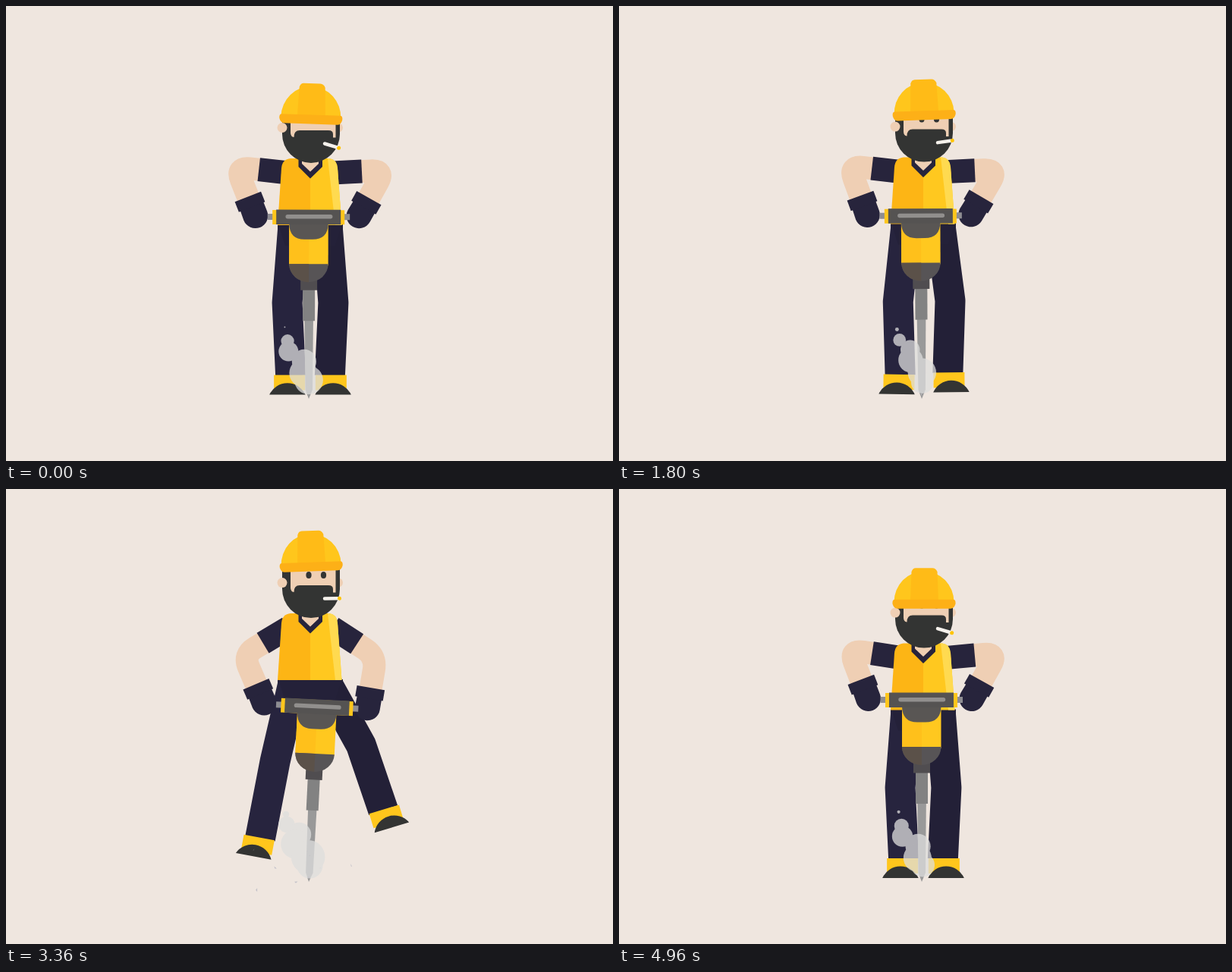
Animation of 800x600 px, one loop 5000 ms. Source, as an HTML page:

```html
<!DOCTYPE html>
<html lang="en">
<head>
<meta charset="utf-8">
<title>Worker with jackhammer</title>
<style>
html, body { margin: 0; width: 100%; height: 100%; overflow: hidden; background: #efe6df; }
svg { display: block; width: 100%; height: 100%; }
</style>
</head>
<body>
<svg viewBox="0 0 800 600" xmlns="http://www.w3.org/2000/svg">
  <defs>
    <g id="glove" fill="#27243c">
      <path d="M-16-14H16.5V0A16.5 16.5 0 0 1-16.5 0Z"/>
      <rect x="-18.5" y="-27" width="37" height="14.5"/>
    </g>
    <g id="foot">
      <rect x="-22" y="-1" width="41" height="20" fill="#ffc61c"/>
      <path d="M-28 25A26 26 0 0 1 19.5 25Z" fill="#333433"/>
    </g>
  </defs>

  <g fill="none" stroke-width="40" stroke-linejoin="round">
    <path id="legL" stroke="#27243e"/>
    <path id="legR" stroke="#232037"/>
  </g>
  <use id="footL" href="#foot"/>
  <use id="footR" href="#foot"/>

  <g fill="none">
    <path id="armL" stroke="#efcfb4" stroke-width="30"/>
    <path id="armR" stroke="#efcfb4" stroke-width="30"/>
    <path id="sleeveL" stroke="#27243c" stroke-width="31"/>
    <path id="sleeveR" stroke="#27243c" stroke-width="31"/>
  </g>

  <g id="body">
    <path d="M359 288H443L434 316H368Z" fill="#242139"/>
    <path d="M358 289L363 214Q364 202 375 201H402V289Z" fill="#fdb515"/>
    <path d="M401 201H426Q436 202 437 214L442.500 289H401Z" fill="#ffc81f"/>
    <path d="M424 201H426Q436 202 437 214L442.500 289H434Z" fill="#ffda50"/>
    <path d="M385.500 200V212L401 227.500L417 212V200Z" fill="#27243c"/>
    <path d="M390 200V208L401 218.500L412 208V200Z" fill="#efcfb4"/>

    <circle cx="438" cy="160.500" r="6" fill="#efcfb4"/>
    <path d="M364 140V169A38 38 0 0 0 440 169V140Z" fill="#333433"/>
    <path d="M375 140H434.500V173.500H431V169Q431 164 425 164H387Q379.500 164 379.500 173Q375 172.500 375 167Z" fill="#efcfb4"/>
    <circle cx="364" cy="160.500" r="6.500" fill="#efcfb4"/>
    <ellipse cx="399" cy="150.500" rx="3.600" ry="4.500" fill="#333433"/>
    <ellipse cx="418.500" cy="150.500" rx="3.600" ry="4.500" fill="#333433"/>
    <g id="cig">
      <path d="M420 181.500H437" stroke="#f5f1ec" stroke-width="4.500" stroke-linecap="round"/>
      <circle cx="439.500" cy="181.500" r="2.500" fill="#ffc400"/>
    </g>
    <g id="helmet">
      <path d="M362.500 147A39.500 41 0 0 1 441.500 147Z" fill="#ffc61c"/>
      <path d="M384 146L385.500 107Q387 102 391 102H413Q417.500 102 419.500 107L421 146Z" fill="#ffbb17"/>
      <path d="M363 143.500H441Q444 144 443.500 149Q442 155.500 437 155.500H367Q362 155.500 360.500 149Q360 144 363 143.500Z" fill="#fdb017"/>
    </g>
  </g>

  <use id="gloveL" href="#glove"/>
  <use id="gloveR" href="#glove"/>

  <g id="drill">
    <path d="M393 395H405L404 506L399 518L394.500 506Z" fill="#999"/>
    <g id="hammer">
      <rect x="391" y="372" width="16" height="43" fill="#828282"/>
      <rect x="388" y="358" width="22" height="16.500" fill="#504d50"/>
      <path d="M344.500 274H453V282H344.500Z" fill="#8e8d92"/>
      <rect x="351" y="269" width="95" height="19" fill="#ffc61c"/>
      <rect x="373" y="286" width="51.500" height="56" fill="#ffc81f"/>
      <rect x="373" y="286" width="26" height="56" fill="#ffc01b"/>
      <path d="M373 340H424.500A25.700 24 0 0 1 373 340Z" fill="#575456"/>
      <path d="M373 340H399V364A26 24 0 0 1 373 340Z" fill="#5b5149"/>
      <path d="M373 287H424.500Q424 307.500 404 307.500H393Q373.500 307.500 373 287Z" fill="#595654"/>
      <rect x="356" y="268.500" width="85" height="19.500" fill="#555352"/>
      <path d="M371 277.700H427.500" stroke="#918f8d" stroke-width="5.500" stroke-linecap="round"/>
    </g>
  </g>

  <g id="smoke" fill="#dededd" opacity=".75"></g>
  <g id="chips" fill="#c4c2c9"></g>
</svg>
<script>
const LOOP = 5000, TAU = Math.PI * 2, RISE = 1740, DROP = 3840;
const { sin, cos, atan2, hypot, min, max, PI } = Math;
const $ = id => document.getElementById(id);
const set = (id, name, value) => $(id).setAttribute(name, value);
const move = (id, value) => set(id, 'transform', value);
const clamp = v => max(0, min(1, v));
const rad = deg => deg * PI / 180;

// time, hammer slide, drill angle
const DRILL = [[0, 0, 0], [640, 0, 2.5], [1360, 11, 3.6], [2240, -14, -4.2],
  [2920, 0, 4.1], [3760, 11, 0], [4960, 0, 0], [5000, 0, 0]];

// linear keys, with whole shaking waves between neighbours
function drillAt(t) {
  const i = DRILL.findIndex(k => k[0] > t), a = DRILL[i - 1], b = DRILL[i];
  const d = b[0] - a[0], u = (t - a[0]) / d;
  const shake = (j, amp, period) =>
    a[j] + (b[j] - a[j]) * u + amp * sin(TAU * u * Math.round(d / period));
  return [shake(1, 5, 200), shake(2, 1.5, 240)];
}

// steady climb, then a sudden drop into a slight crouch
function liftAt(t) {
  if (t < RISE) return 0;
  const top = -0.0228 * (min(t, DROP) - RISE);
  return top + (2.6 - top) * clamp((t - DROP) / 80);
}

// angles lean outwards; straighter legs reach further while in the air
function leg(side, lift, air, thigh, shin) {
  const out = side === 'L' ? -1 : 1, hipX = 401 + out * 23, hipY = 295 + lift;
  const len = 96.5 + air * (14 - 0.8 * thigh);
  const a = rad(4.4 + air * thigh), b = rad(air * shin - 2.7);
  const kx = hipX + out * len * sin(a), ky = hipY + len * cos(a);
  const ax = kx + out * len * sin(b), ay = min(488, ky + len * cos(b));
  set('leg' + side, 'd', `M${hipX} ${hipY - 7}V${hipY}L${kx} ${ky}L${ax} ${ay}`);
  move('foot' + side,
    `translate(${ax} ${ay}) scale(${-out} 1) rotate(${0.78 * air * shin})`);
}

// two equal bones with a soft elbow
function arm(side, sx, sy, hx, hy) {
  const bone = 69, bend = 18, out = side === 'L' ? 1 : -1;
  const d = min(hypot(hx - sx, hy - sy), 2 * bone - 0.1);
  const dir = atan2(hy - sy, hx - sx) + out * Math.acos(d / 2 / bone);
  const c = cos(dir), s = sin(dir), ex = sx + bone * c, ey = sy + bone * s;
  const f = atan2(hy - ey, hx - ex);
  set('arm' + side, 'd', `M${sx} ${sy}L${ex - bend * c} ${ey - bend * s}` +
    `Q${ex} ${ey} ${ex + bend * cos(f)} ${ey + bend * sin(f)}L${hx} ${hy}`);
  set('sleeve' + side, 'd', `M${sx} ${sy}l${39 * c} ${39 * s}`);
  move('glove' + side, `translate(${hx} ${hy}) rotate(${f * 180 / PI - 90})`);
}

let seed = 11;
const rnd = () => (seed = seed * 16807 % 2147483647) / 2147483647;
const spread = n => (rnd() * 2 - 1) * n;
const make = (id, tag) =>
  $(id).appendChild(document.createElementNS('http://www.w3.org/2000/svg', tag));

const PUFFS = 22;
const puffs = Array.from({ length: PUFFS }, (_, i) => ({
  el: make('smoke', 'circle'),
  born: i * LOOP / PUFFS - 50 + spread(40), drift: spread(9)
}));

const chips = Array.from({ length: 40 }, (_, i) => {
  const el = make('chips', 'path');
  el.setAttribute('d', 'M-1-.8L1 .5L-.4 1Z');
  return { el, born: 1800 + i * 65, vx: spread(0.34), vy: -0.28 * rnd(),
    size: 1 + 5 * rnd() ** 2, spin: rnd() * 6, rate: 0.004 + 0.01 * rnd() };
});

// dust rises to the left and shrinks
function drawPuff(p, t, air) {
  const age = (t - p.born + LOOP) % LOOP, life = 1250;
  const size = max(0, 1 - (age / life) ** 2) * clamp(0.4 + age / 120);
  p.el.setAttribute('cx', 402 - 0.03 * age + p.drift * clamp(age / 300));
  p.el.setAttribute('cy', 499 - 0.062 * age);
  p.el.setAttribute('r', size * (19 + 4 * air));
}

function drawChip(c, t) {
  const age = t - c.born, on = age > 0 && age < 600;
  c.el.setAttribute('visibility', on ? 'visible' : 'hidden');
  if (!on) return;
  const x = 399 + c.vx * age, y = 512 + c.vy * age + 0.0003 * age * age;
  const turn = c.spin + c.rate * age, size = c.size * (0.4 + age / 600);
  c.el.setAttribute('transform',
    `translate(${x} ${y}) rotate(${turn * 60}) scale(${size} ${size * cos(turn)})`);
}

function draw(t) {
  const w = TAU * t / LOOP, lift = liftAt(t), air = clamp(-lift / 11);
  const [slide, tilt] = drillAt(t);

  const kick = TAU * (t - 2500) / 2600;
  leg('L', lift, air, 14.5 + 12 * cos(kick), 11 + 3 * sin(kick));
  leg('R', lift, air, 24.5, 14.5 + 8 * sin(kick));

  const hatY = 3 * sin(2 * w) * (1 - air) - 10 * air;
  move('body', `translate(0 ${lift})`);
  move('helmet', `translate(0 ${hatY}) rotate(${2 * cos(32 * w)} 402 142)`);
  move('cig', `rotate(${4 + 13 * cos(4 * w)} 420 181.5)`);
  move('drill', `rotate(${tilt} 399 518)`);
  move('hammer', `translate(0 ${slide})`);

  const c = cos(rad(tilt)), s = sin(rad(tilt)), dy = 276.5 + slide - 518;
  const hand = dx => [399 + dx * c - dy * s, 518 + dx * s + dy * c];
  arm('L', 372, 220 + lift, ...hand(-70.5));
  arm('R', 430, 220 + lift, ...hand(66));

  puffs.forEach(p => drawPuff(p, t, air));
  chips.forEach(p => drawChip(p, t));
}

const start = performance.now();
function tick() {
  draw((performance.now() - start) % LOOP);
  requestAnimationFrame(tick);
}
tick();
</script>
</body>
</html>
```
